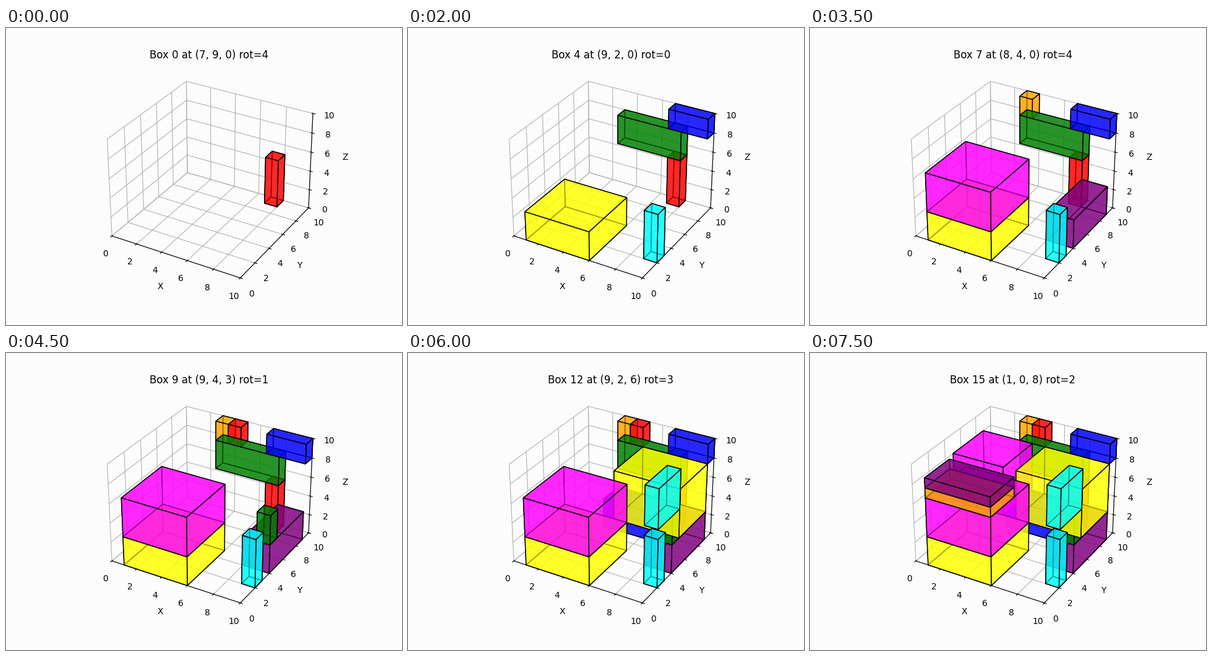
A matplotlib script for the animation above (8000 ms loop, 640x480 px).

```python
import numpy as np
import matplotlib.pyplot as plt
from matplotlib.animation import FuncAnimation
from mpl_toolkits.mplot3d.art3d import Poly3DCollection

SIDE = 10
BG = "#fcfcfc"
COLORS = ["red", "green", "blue", "yellow", "cyan", "magenta", "orange", "purple"]

# Packing moves: column (x, y), box size, rotation; z follows from drop()
MOVES = [
    ((7, 9), (1, 1, 5), 4), ((3, 9), (5, 1, 3), 2),
    ((7, 9), (3, 1, 2), 4), ((1, 0), (5, 5, 3), 2),
    ((9, 2), (1, 1, 5), 0), ((1, 0), (5, 5, 4), 1),
    ((3, 9), (1, 1, 2), 2), ((8, 4), (2, 5, 3), 4),
    ((4, 9), (1, 1, 2), 2), ((9, 4), (1, 1, 3), 1),
    ((3, 7), (4, 2, 3), 4), ((5, 5), (5, 4, 5), 3),
    ((9, 2), (1, 3, 4), 3), ((0, 5), (4, 4, 5), 2),
    ((1, 0), (5, 3, 1), 2), ((1, 0), (5, 3, 1), 2),
]


def drop(heights, x, y, size):
    """Let a box fall onto the stack and return the height it rests at."""
    w, d, h = size
    area = heights[x:x + w, y:y + d]
    z = int(area.max())
    area[:] = z + h
    return z


def box_faces(pos, size):
    """The two opposite faces across each axis."""
    faces = []
    for axis in range(3):
        u, v = (axis + 1) % 3, (axis + 2) % 3
        for side in (0, 1):
            face = np.zeros((4, 3))
            face[:, axis] = side
            face[:, u] = 0, 1, 1, 0
            face[:, v] = 0, 0, 1, 1
            faces.append(pos + face * size)
    return faces


fig = plt.figure(figsize=(6.4, 4.8), dpi=100, facecolor=BG)
ax = fig.add_subplot(projection="3d", facecolor=BG)
ax.set(xlim=(0, SIDE), ylim=(0, SIDE), zlim=(0, SIDE),
       xlabel="X", ylabel="Y", zlabel="Z")
for axis in (ax.xaxis, ax.yaxis, ax.zaxis):
    axis.set_pane_color(BG)

heights = np.zeros((SIDE, SIDE), dtype=int)
solids, titles = [], []
for n, ((x, y), size, rot) in enumerate(MOVES):
    pos = (x, y, drop(heights, x, y, size))
    solid = Poly3DCollection(box_faces(pos, size), facecolors=COLORS[n % len(COLORS)],
                             edgecolors="black", linewidths=1, alpha=0.6)
    ax.add_collection3d(solid)
    solids.append(solid)
    titles.append(f"Box {n} at {pos} rot={rot}")


def update(step):
    for n, solid in enumerate(solids):
        solid.set_visible(n <= step)
    ax.set_title(titles[step])
    return solids


anim = FuncAnimation(fig, update, frames=len(MOVES), init_func=lambda: update(0),
                     interval=500, repeat=True, repeat_delay=0)
plt.show()
```
